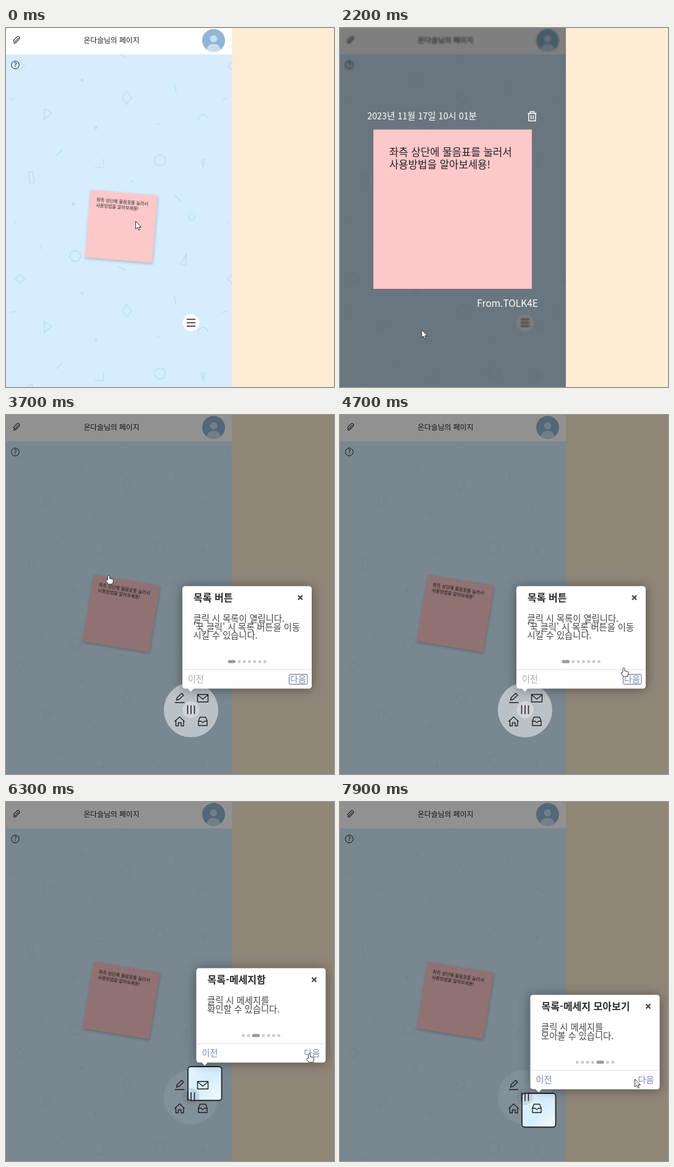
Animation, 530 px wide and 578 px high, one loop 8000 ms. Source, as an HTML page:

```html
<!DOCTYPE html>
<html lang="ko">
<head>
<meta charset="utf-8">
<style>
  html, body { margin: 0; width: 100%; height: 100%; overflow: hidden; background: #fdebd3; }
  svg { display: block; }
  text { font-family: 'Noto Sans CJK KR', 'Noto Sans CJK', sans-serif; }
  .line { fill: none; stroke: #222; stroke-width: 1.4; stroke-linejoin: round; }
  #note { filter: drop-shadow(1px 2px 2px rgba(0,0,0,.22)); }
  #popup { filter: drop-shadow(0 1px 9px rgba(0,0,0,.4)); }
</style>
</head>
<body>
<svg width="530" height="578" viewBox="0 0 530 578">
  <defs>
    <clipPath id="pageClip"><path d="M0 0H365V578H0Z"/></clipPath>
    <clipPath id="bodyClip"><path d="M0 42.500H365V578H0Z"/></clipPath>
    <linearGradient id="glow" x2="1" y2="1"><stop stop-color="#e6f5ff"/><stop offset=".5" stop-color="#d4edfe"/><stop offset="1" stop-color="#f4faff"/></linearGradient>
    <g id="shapes" fill="none" stroke="#c6dfef" stroke-width="1.7">
      <path d="M22 54l8 7-8 7-7-7ZM195 102l8 10-8 11-7-11ZM62 130l12 7-12 10ZM291 364l-9 16 9 3Z"/>
      <path d="M272 89l3 15M6 115l9-2M81 206l10-10M271 268l12 11M56 349l1 7M181 384l14 7M143 225l15-1-1-13"/>
      <path d="M310 150q1-10 8-11 6 0 9 8M316 213l5-1-2 5h2l-3 8v-6h-2Z"/>
      <path d="M36 233l7-2 3 18-7 2Z"/>
      <path id="ring" d="M249 204l7 3 2 7-4 7-8 1-6-6 1-8Z"/>
      <use href="#ring" x="-137" y="154"/>
      <circle cx="300" cy="304" r="5"/>
      <path stroke-width="5.500" stroke-linecap="round" d="M123 84h.1M145 160h.1M109 283h.1"/>
      <path stroke-width="3.500" stroke-linecap="round" d="M246 155h.1M203 247h.1M15 313h.1"/>
    </g>
    <g id="memo">
      <path fill="#fdc8ca" d="M0 0H256V256.500H0Z"/>
      <g font-size="16.700" fill="#222"><text x="25.500" y="42">좌측 상단에 물음표를 눌러서</text><text x="25.500" y="62">사용방법을 알아보세용!</text></g>
    </g>
    <path id="bars" class="line" style="stroke-width:1.6" d="M-7-5.500H7M-7 0H7M-7 5.500H7"/>
  </defs>

  <path fill="#fdebd3" d="M0 0H530V578H0Z"/>
  <path fill="#d5edff" d="M0 0H365V578H0Z"/>
  <path fill="#fff" d="M0 0H365V42.500H0Z"/>
  <g clip-path="url(#pageClip)">
    <g id="page">
      <g id="pattern" clip-path="url(#bodyClip)">
        <use href="#shapes"/><use href="#shapes" x="343"/><use href="#shapes" y="343"/>
        <use href="#shapes" x="343" y="343"/><use href="#shapes" y="-343"/>
      </g>
      <path class="line" style="stroke-width:1.1" d="M20 16l-5 5.500q-1.500 1-2.300 0t0-2.200l5-5q2-1.500 3.500 0t0 3.500l-5 5.500q-2.500 2-4.200 0"/>
      <text x="170.500" y="24.300" font-size="11.800" text-anchor="middle" fill="#222">온다슬님의 페이지</text>
      <circle cx="335.500" cy="20" r="18.500" fill="#90b5d5"/>
      <circle cx="335.500" cy="17.500" r="5.800" fill="#c8deee"/>
      <path fill="#c8deee" d="M324.500 35q1-9.500 11-9.500t11 9.500q-11 7-22 0Z"/>
      <circle class="line" style="stroke-width:1" cx="15" cy="59.500" r="6.300"/>
      <text x="15" y="63.300" font-size="10.500" text-anchor="middle" fill="#222">?</text>
      <g id="note"><use href="#memo" transform="translate(-54.400 -54.500) scale(.425)"/></g>
      <g id="closedMenu" transform="translate(299 474.500)"><circle r="13.500" fill="#fff"/><use href="#bars"/></g>
    </g>
    <g id="modal">
      <path fill="#000" opacity=".5" d="M0 0H365V578H0Z"/>
      <use href="#memo" x="54" y="163.500"/>
      <g fill="#fff" font-weight="500">
        <text x="44" y="147" font-size="14.300">2023년 11월 17일 10시 01분</text>
        <text x="320" y="448.500" font-size="15.500" text-anchor="end">From.TOLK4E</text>
      </g>
      <path class="line" style="stroke:#fff;stroke-width:1.500" d="M303.500 137.500H317.500M307.500 137V134.500H313.500V137M305 138V149.500H316V138M308.700 140.500V147M312.300 140.500V147"/>
    </g>
  </g>

  <path id="dim" d="M0 0H530V578H0Z"/>
  <g id="tour">
    <circle id="dial" cx="299" cy="475" fill="#fff"/>
    <path id="quarter" fill="#fff" opacity=".42" d="M299 475V431A44 44 0 0 1 343 475Z"/>
    <rect id="stage" width="54.500" height="54.500" rx="4.500" fill="url(#glow)" stroke="#22282c" stroke-width="1.800"/>
    <circle id="hub" cx="299" cy="474.500" r="13.500"/>
    <use id="openBars" href="#bars"/>
    <g id="icons" class="line">
      <path d="M273 463H288.500M275.500 459l1-4 7.500-7 3 3-7.500 7Z"/>
      <path d="M309.500 450H326.500V462H309.500ZM309.500 450.500l8.500 7 8.500-7"/>
      <path d="M272.500 493.500l8-7.500 8 7.500M274.500 492V500.500H278.500V495.500H283V500.500H287V492"/>
      <path d="M311 492.500l2.500-6H322.500l2.500 6V500H311ZM311 493H315.500q2.500 4 5 0H325"/>
    </g>
  </g>
  <g id="popup"></g>
  <g id="cursor" stroke="#222" stroke-width=".9" fill="#fff" stroke-linejoin="round">
    <path id="arrow" d="M0 0V12.500L3 10 5 14.500 7 13.600 5 9.500H9Z"/>
    <path id="hand" d="M-1.500 1.500a1.500 1.500 0 0 1 3 0V5l5 1q1.500 .5 1 3l-1 5h-7l-4-5q0-2 3-1.500Z"/>
  </g>
</svg>
<script>
const LOOP = 8000;
const el = {};
document.querySelectorAll('[id]').forEach(node => el[node.id] = node);

// Tour steps: start time, corner of the highlighted square, title, body lines
const steps = [
  { at: 3300, x: 271.5, y: 447, title: '목록 버튼', body: ['클릭 시 목록이 열립니다.', "'꾹 클릭' 시 목록 버튼을 이동", '시킬 수 있습니다.'] },
  { at: 5250, x: 258, y: 426, title: '목록-메세지 작성', body: ['클릭 시 메세지를', '작성할 수 있습니다.'] },
  { at: 5800, x: 294, y: 426, title: '목록-메세지함', body: ['클릭 시 메세지를', '확인할 수 있습니다.'] },
  { at: 6350, x: 250, y: 469, title: '목록-홈', body: ['클릭 시 마이페이지로', '이동할 수 있습니다.'] },
  { at: 7250, x: 294, y: 469, title: '목록-메세지 모아보기', body: ['클릭 시 메세지를', '모아볼 수 있습니다.'] }
];

// Pointer stops: time, x, y
const pointer = [
  [0, 209.5, 311], [900, 209.5, 311], [1300, 112, 222], [1550, 247, 222], [1800, 226, 361],
  [2200, 132, 486], [2400, 132, 486], [3150, 13.5, 62], [3350, 13.5, 62], [3700, 165.5, 258],
  [4500, 458.5, 407], [5650, 458.5, 407], [6000, 490, 405], [6400, 490, 405],
  [6850, 449, 449], [7250, 449, 449], [7700, 476.5, 446], [LOOP, 476.5, 446]
];

const ramp = (t, start, end) => Math.min(1, Math.max(0, (t - start) / (end - start)));
const ease = p => p * p * (3 - 2 * p);
const mix = (a, b, p) => a + (b - a) * p;
const set = (node, attrs) => { for (const k in attrs) node.setAttribute(k, attrs[k]); };
const show = (node, on) => node.style.display = on ? '' : 'none';

function label(x, y, size, fill, text, extra = '') {
  return `<text x="${x}" y="${y + size * .37}" font-size="${size}" fill="${fill}" ${extra}>${text}</text>`;
}

function popupMarkup(step, index) {
  const height = step.body.length > 2 ? 165 : 152;
  const first = index === 0;
  let dots = '';
  for (let i = 0, x = 73.5; i < 7; i++) {
    const width = i === index ? 12.5 : 5;
    dots += `<rect x="${x}" y="${height - 46}" width="${width}" height="5" rx="2.5" fill="${i === index ? '#999' : '#ccc'}"/>`;
    x += width + 3.3;
  }
  return `<g transform="translate(${step.x + 13.5} ${step.y - 6.5 - height})">
    <path fill="#fff" d="M8 ${height - 1}h11l-5.5 6Z"/>
    <rect width="209" height="${height}" rx="4.5" fill="#fff"/>
    ${label(18, 18.5, 16, '#2d2d2d', step.title, 'font-weight="600"')}
    <path d="M187 15l7 7m0-7l-7 7" stroke="#444" stroke-width="2.2"/>
    ${step.body.map((line, i) => label(17.5, 52.5 + i * 13.5, 14.3, '#444', line, 'font-weight="300"')).join('')}
    ${dots}
    <path d="M0 ${height - 30.5}H209" stroke="#ddd"/>
    ${label(9, height - 15.5, 14, first ? '#aaa' : '#7787b4', '이전')}
    ${label(174, height - 15.5, 14, '#7787b4', '다음')}
    ${first ? `<rect x="172.5" y="${height - 23}" width="29.5" height="16" rx="2" fill="none" stroke="#5a6a94"/>` : ''}
  </g>`;
}

let shownStep = -1;

function drawTour(t) {
  const index = steps.filter(s => t >= s.at).length - 1;
  const active = index >= 0;
  [el.tour, el.popup].forEach(node => show(node, active));
  show(el.closedMenu, !active);
  set(el.dim, { opacity: .43 * ramp(t, 3300, 3520) });
  if (!active) return;

  const step = steps[index], from = steps[Math.max(0, index - 1)];
  const open = ease(ramp(t, 3300, 3550));
  const lit = 1 - ramp(t, 5250, 5450);
  const move = ease(ramp(t, step.at, step.at + 230));
  if (index !== shownStep) {
    el.popup.innerHTML = popupMarkup(step, index);
    shownStep = index;
  }
  set(el.popup, { opacity: ramp(t, step.at + 250, step.at + 370) });
  set(el.dial, { r: mix(13.5, 44, open), opacity: mix(.07, .49, lit) });
  set(el.stage, { x: mix(from.x, step.x, move), y: mix(from.y, step.y, move), opacity: 1 - lit });
  set(el.hub, { fill: lit > .5 ? '#fff' : '#667', opacity: mix(.18, .32, lit) });
  set(el.openBars, { transform: `translate(299 474.5) rotate(${90 * open})` });
  set(el.icons, { opacity: open });
  show(el.quarter, index === 1);
}

function drawPointer(t) {
  const i = pointer.findIndex(p => p[0] > t);
  const [t0, x0, y0] = pointer[i - 1], [t1, x1, y1] = pointer[i];
  const p = ramp(t, t0, t1);
  const pointing = t > 3100 && t < 6400;
  set(el.cursor, { transform: `translate(${mix(x0, x1, p)} ${mix(y0, y1, p)})` });
  show(el.hand, pointing);
  show(el.arrow, !pointing);
}

function draw(now) {
  const t = now % LOOP;
  const modal = ramp(t, 100, 380) * (1 - ramp(t, 2330, 2580));
  el.page.style.filter = modal ? `blur(${1.8 * modal}px)` : 'none';
  set(el.modal, { opacity: modal });
  set(el.pattern, { opacity: 1 - .4 * Math.max(modal, ramp(t, 3300, 3520)) });
  set(el.note, { transform: `translate(186.3 319.3) rotate(${t < 2350 ? 4.7 : 9.4})` });
  drawTour(t);
  drawPointer(t);
}

const begin = performance.now();
(function frame() {
  draw(performance.now() - begin);
  requestAnimationFrame(frame);
})();
</script>
</body>
</html>
```
